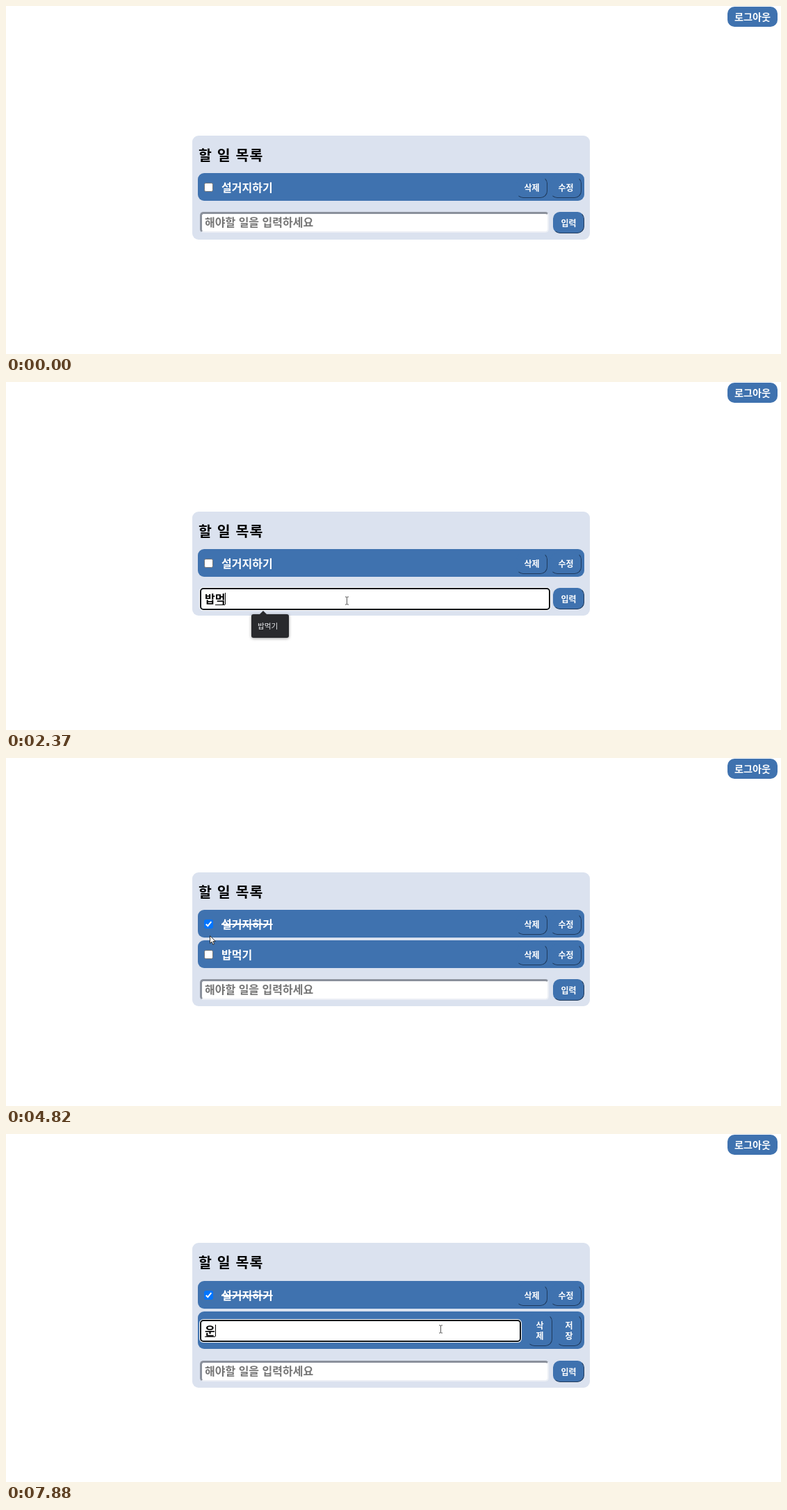
Write an HTML page that moves like this. It is 1115 px wide and 502 px high and loops after 8000 ms.

```html
<!DOCTYPE html>
<html lang="ko">
<head>
<meta charset="utf-8">
<title>할 일 목록</title>
<style>
html, body { margin: 0; width: 100%; height: 100%; overflow: hidden; background: #fff; }
body { font: 700 16px "Noto Sans CJK KR", "Noto Sans CJK JP", "Noto Sans CJK", sans-serif; }
#stage { position: absolute; left: 0; top: 0; width: 1115px; height: 502px; overflow: hidden; }
#stage div, #stage svg { position: absolute; box-sizing: border-box; white-space: pre; }
#stage svg { overflow: visible; }
.panel { background: #dbe2ef; border-radius: 9px; }
.row { background: #3f72af; border-radius: 9px; }
.title { font-size: 20.5px; letter-spacing: 1.1px; line-height: 30px; color: #000; }
.item { color: #fff; line-height: 40px; }
.done { text-decoration: line-through; text-decoration-thickness: 2px; }
.btn { background: #3f72af; border: 1px solid; border-color: #3f72af #1f3a5c #1f3a5c #3f72af; border-radius: 10px; color: #fff;
  font-size: 12px; line-height: 15.5px; text-align: center; display: flex; align-items: center; justify-content: center; }
.hover { background: #fff; border-color: #fff #d5d9e0 #d5d9e0 #fff; color: #000; }
.logout { border: 0; font-size: 14.2px; }
.field { background: #fff; border: solid; border-width: 3px 2px 2px 3px; border-radius: 5px;
  border-color: #8b919c #eceff5 #eceff5 #8b919c; }
.focus { border: 2px solid #101418; box-shadow: 0 0 0 1px #fff; }
.line { height: 17px; line-height: 17px; color: #000; }
.line span { display: inline-block; height: 17px; }
.line .hint { color: #757575; position: relative; top: -1px; }
.line .comp { box-shadow: 0 1px #000; }
.line .sel { background: #3297fd; color: #fff; }
.line i { display: inline-block; width: 1px; height: 17px; margin-right: -1px; background: #000; vertical-align: top; }
.check { background: #fff; border: 1px solid #767676; border-radius: 2.5px; }
.checked { background: #0075ff; border-color: #0075ff; }
.pop { background: #292a2d; border-radius: 3px; box-shadow: 0 1px 4px rgba(0,0,0,.4); }
.pop div { left: 9px; color: #e8eaed; font-size: 10.6px; font-weight: 400; line-height: 34px; }
.click { border-radius: 50%; background: rgba(255,247,60,.72); }
</style>
</head>
<body>
<div id="stage"></div>
<script>
const LOOP = 8000;
const stage = document.getElementById('stage');

// [start, end, steps, waypoints]: the pointer advances in discrete steps
const MOVES = [
  [190, 400, 4, [[841, 463], [655, 410], [530, 362], [475, 344]]],
  [670, 870, 4, [[478, 338], [484, 327], [489, 318], [490, 315]]],
  [3250, 3250, 1, [[485, 314]]],
  [3400, 4020, 10, [[478, 312], [400, 285], [320, 250], [262, 228], [290, 240]]],
  [4820, 5580, 12, [[294, 257], [330, 270], [470, 290], [620, 294], [708, 293]]],
  [5650, 6070, 7, [[722, 291], [760, 286], [797, 283]]],
  [6470, 6680, 4, [[740, 283], [680, 281], [640, 280], [625, 281]]]
];
const CLICKS = [[1010, 1220], [4220, 4420], [6200, 6400], [6950, 7280]];

// [time, committed text, composing syllable]
const TYPED = [
  [1810, '', 'ㅂ'], [1880, '', '배'], [1950, '', '바'], [2080, '', '밥'], [2220, '밥', 'ㅁ'],
  [2300, '밥', '머'], [2370, '밥', '먹'], [2440, '밥먹', 'ㄱ'], [2510, '밥먹', '기'],
  [2640, '밥먹기', ''], [2710, '', '']
];
const EDITED = [[6340, '밥먹기', ''], [7740, '', 'ㅇ'], [7810, '', '우'], [7880, '', '운']];
const HISTORY = ['밥먹기', 'gd', 'ㅎㅇ', 'ㅇㄹㅇㄴㄹㅇㄴㄹㄴㄹ', '공부', 'ㄹㅎㄹ'];

const between = (t, a, b) => t >= a && t < b;
const clamp = v => Math.max(0, Math.min(1, v));
const latest = (list, t) => list.filter(e => t >= e[0]).pop();

function pointer(t) {
  const move = latest(MOVES, t);
  if (!move) return null;
  const [a, b, n, pts] = move;
  const p = b > a ? Math.floor(clamp((t - a) / (b - a)) * (n - 1) + 1e-6) / (n - 1) : 0;
  const u = p * (pts.length - 1), i = Math.min(Math.floor(u), pts.length - 1);
  const from = pts[i], to = pts[Math.min(i + 1, pts.length - 1)];
  return from.map((v, k) => v + (to[k] - v) * (u - i));
}

function box(cls, x, y, w, h, body = '', style = '') {
  return `<div class="${cls}" style="left:${x}px;top:${y}px;width:${w}px;height:${h}px;${style}">${body}</div>`;
}

function button(label, x, y, w, h, at) {
  const over = at && at[0] >= x && at[0] < x + w && at[1] >= y && at[1] < y + h;
  return box('btn' + (over ? ' hover' : ''), x, y, w, h, label);
}

function checkbox(x, y, on) {
  const tick = '<svg style="left:-1px;top:-1px" width="13" height="13"><path d="M2.8 6.8 5.3 9.3 10.3 3.2" fill="none" stroke="#fff" stroke-width="2"/></svg>';
  return box(on ? 'check checked' : 'check', x, y, 13, 13, on ? tick : '');
}

function row(label, y, done, at) {
  return box('row', 276, y, 556, 40) + checkbox(285, y + 13.5, done) +
    box(done ? 'item done' : 'item', 310, y, 74, 40, label) +
    button('삭제', 734, y + 5, 45, 31, at) + button('수정', 783, y + 5, 45, 31, at);
}

function field(y, w, focused, text, comp, opt) {
  const span = (cls, s) => s ? `<span class="${cls}">${s}</span>` : '';
  const hint = !text && !comp ? opt.hint : '';
  return box(focused ? 'field focus' : 'field', 279, y, focused ? w + 2 : w, focused ? 32 : 30) +
    box('line', 286, y + 7, 400, 17, span(opt.sel ? 'sel' : '', text) + span('comp', comp) +
      (opt.caret ? '<i></i>' : '') + span('hint', hint));
}

function popup(items, w, alpha) {
  if (alpha <= 0) return '';
  const h = 34 + 26.8 * (items.length - 1);
  const arrow = '<svg style="left:11px;top:-5px" width="12" height="6"><path d="M0 6 6 0 12 6Z" fill="#292a2d"/></svg>';
  return box('pop', 353, 335, w, h, arrow + items.map((s, i) => box('', 9, i * 26.8, w - 9, 34, s)).join(''),
    `opacity:${alpha.toFixed(2)};transform:scale(${(.947 + .053 * alpha).toFixed(4)})`);
}

function cursor([x, y], beam) {
  const shape = beam
    ? '<path d="M-2-5H0L.5-4.5 1-5H3M.5-4.5V5.5M-2 6H0L.5 5.5 1 6H3" fill="none" stroke="#444" stroke-width=".9"/>'
    : '<path d="M-.5-.5V10.4L2 8.1 3.8 12.1 5.6 11.3 3.9 7.4H7.3Z" fill="#fff" stroke="#222" stroke-width=".9"/>';
  return `<svg style="left:${x.toFixed(1)}px;top:${y.toFixed(1)}px" width="1" height="1">${shape}</svg>`;
}

function scene(t) {
  const two = t >= 2710, edit = t >= 6340;
  const [top, height] = edit ? [157, 209] : two ? [165, 193] : [187, 150];
  const first = edit ? 212 : two ? 219 : 241;
  const entry = edit ? 327 : two ? 319 : 297;
  const at = pointer(t);

  let out = box('btn logout', 1038, 1, 72, 29, '로그아웃') +
    box('panel', 268, top, 572, height) +
    box('title', 277, top + 12, 120, 30, '할 일 목록') +
    row('설거지하기', first, t >= 4290, at);

  if (edit) {
    const [, text, comp] = latest(EDITED, t);
    const focused = t >= 6950, sel = between(t, 7090, 7740);
    out += box('row', 276, 256, 556, 54) +
      field(268, 460, focused, text, comp, { sel, caret: focused && !sel }) +
      button('삭<br>제', 750, 260, 36, 46, at) + button('저<br>장', 792, 260, 36, 46, at);
  } else if (two) {
    out += row('밥먹기', 263, false, at);
  }

  const [, text, comp] = latest(TYPED, t) || [0, '', ''];
  const focused = between(t, 1010, 4220);
  const caret = focused && !between(t, 1540, 1810) && !between(t, 3200, 3730);
  out += field(entry, 502, focused, text, comp, { caret, hint: '해야할 일을 입력하세요' }) +
    button('입력', 787, entry, 45, 31, at);

  if (t < 1950) {
    out += popup(HISTORY, 126, t < 1810 ? clamp((t - 1080) / 200) : t < 1880 ? .8 : .42);
  } else {
    out += popup(['밥먹기'], 54, t < 2640 ? clamp((t - 2080) / 140) : t < 2710 ? .42 : 0);
  }

  if (at) {
    if (CLICKS.some(([a, b]) => between(t, a, b))) out += box('click', at[0] - 9, at[1] - 8, 16, 16);
    out += cursor(at, between(t, 740, 2710) || t >= 6540);
  }
  return out;
}

let shown = '';
function frame(now) {
  const html = scene(now % LOOP);
  if (html !== shown) stage.innerHTML = shown = html;
  requestAnimationFrame(frame);
}
frame(0);
</script>
</body>
</html>
```
